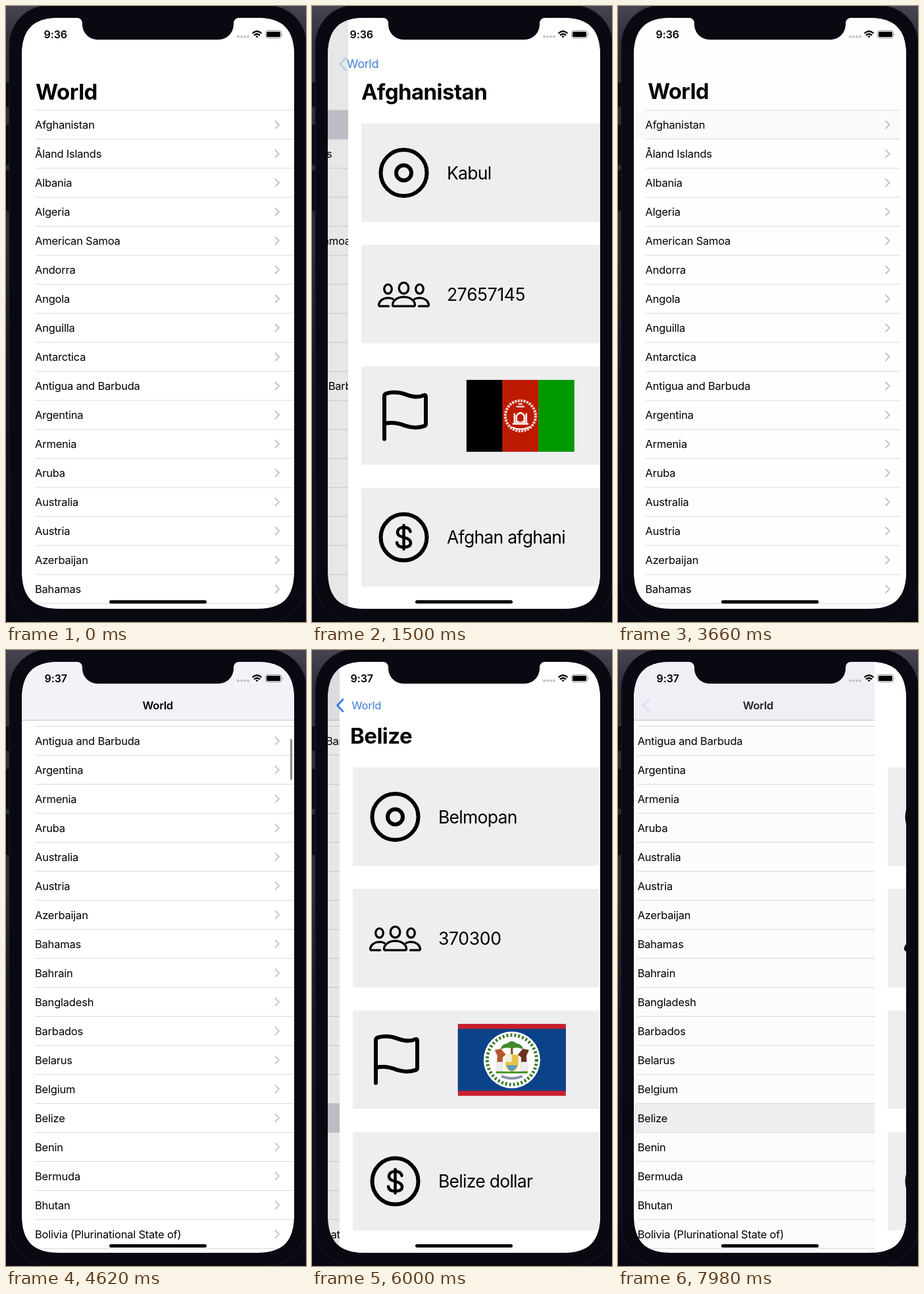
An HTML page that plays this animation: 456 px wide and 934 px high, repeating every 8000 ms.

```html
<!DOCTYPE html>
<html lang="en">
<head>
<meta charset="utf-8">
<title>World list</title>
<style>
  html, body { margin: 0; width: 100%; height: 100%; overflow: hidden; background: #0a0a14; }
  svg { display: block; width: 456px; height: 934px; }
  text { font-family: Inter, "Liberation Sans", sans-serif; }
  .row { font-size: 16.5px; letter-spacing: -.22px; }
  .big { font-size: 33px; font-weight: 700; letter-spacing: -.55px; }
  .val { font-size: 26.5px; letter-spacing: -.72px; }
  .num { letter-spacing: -.3px; }
  .mid { font-size: 16.5px; font-weight: 600; letter-spacing: -.2px; }
  .back { font-size: 16.5px; letter-spacing: -.2px; fill: #3b7ddd; }
  .time { font-size: 16px; font-weight: 600; letter-spacing: -.1px; }
  .ink { fill: none; stroke: #000; stroke-linecap: round; stroke-linejoin: round; }
</style>
</head>
<body>
<svg viewBox="0 0 456 934">
  <defs>
    <linearGradient id="wall" x2="0" y2="1">
      <stop offset="0" stop-color="#454450"/>
      <stop offset=".06" stop-color="#302f38"/>
      <stop offset=".4" stop-color="#2b2b33"/>
      <stop offset=".6" stop-color="#15151f"/>
      <stop offset="1" stop-color="#080812"/>
    </linearGradient>
    <clipPath id="screen">
      <path d="M24 76C24 35 41 18 82 18H380C421 18 438 35 438 76V856C438 897 421 914 380 914H82C41 914 24 897 24 856Z"/>
    </clipPath>
  </defs>

  <rect width="456" height="934" fill="url(#wall)"/>
  <g fill="#0b0b14" stroke="#050509">
    <rect x=".5" y="116.500" width="8" height="36" rx="1"/>
    <rect x=".5" y="180.500" width="8" height="60" rx="1"/>
    <rect x=".5" y="249.500" width="8" height="61" rx="1"/>
  </g>
  <rect x="5" y="-1" width="452" height="935" rx="60" fill="#090912" stroke="#1c1c26"/>

  <g clip-path="url(#screen)">
    <rect x="24" y="18" width="414" height="896" fill="#fff"/>
    <g id="list">
      <g id="rows"></g>
      <rect id="bar" x="24" y="18" width="414" height="88"/>
      <path id="rule" d="M24 106.500H438" stroke="#c4c4c9"/>
    </g>
    <rect id="dim" x="24" y="18" width="414" height="896"/>
    <rect id="thumb" x="432" width="3" height="62" rx="1.500" fill="#8a8a8d"/>
    <g id="pages"></g>
    <g id="nav">
      <path id="chev" d="M47 75L38.500 84L47 93" class="ink" style="stroke:#3b7ddd" stroke-width="2.800"/>
      <text id="large" class="big">World</text>
      <text id="inline" class="mid">World</text>
      <text id="label" class="back">World</text>
    </g>
    <text id="clock" class="time" y="48.500"></text>
    <g fill="#c3c3c5">
      <circle cx="353" cy="46.500" r="2"/><circle cx="358" cy="46.500" r="2"/>
      <circle cx="363" cy="46.500" r="2"/><circle cx="368" cy="46.500" r="2"/>
    </g>
    <g class="ink" stroke-width="2.300" style="stroke-linecap:butt">
      <path d="M374.500 41.500Q381.500 35 388.500 41.500M377 44.500Q381.500 40.500 386 44.500"/>
      <path d="M379.300 46L381.500 48.300L383.700 46Q381.500 44.500 379.300 46Z" fill="#000" stroke="none"/>
    </g>
    <rect x="394.500" y="37.500" width="24" height="11" rx="3" fill="none" stroke="#8c8c8c"/>
    <rect x="396" y="39" width="21" height="8" rx="1.600"/>
    <path d="M420 41.500Q421.800 43 420 45Z" fill="#8c8c8c"/>
    <rect x="157" y="901" width="148" height="5" rx="2.500"/>
  </g>
  <path fill="#090912" d="M108 17V18A8 8 0 0 1 116 26V28A23 23 0 0 0 139 51H323A23 23 0 0 0 346 28V26A8 8 0 0 1 354 18V17Z"/>
</svg>

<script>
const $ = id => document.getElementById(id);
const clamp = x => Math.max(0, Math.min(1, x));
const set = (id, attrs) => { for (const k in attrs) $(id).setAttribute(k, attrs[k]); };

const LOOP = 8000, STEP = 60, SCROLL = 438.4, TOP = 158, ROW = 44;
const countries = ('Afghanistan|Åland Islands|Albania|Algeria|American Samoa|Andorra|Angola|Anguilla|' +
  'Antarctica|Antigua and Barbuda|Argentina|Armenia|Aruba|Australia|Austria|Azerbaijan|Bahamas|Bahrain|' +
  'Bangladesh|Barbados|Belarus|Belgium|Belize|Benin|Bermuda|Bhutan|Bolivia (Plurinational State of)').split('|');

$('rows').innerHTML = `<rect id="hit" x="24" width="414" height="${ROW}" fill="#d0cfd8"/>` +
  countries.map((name, i) => {
    const y = TOP + ROW * i;
    return `<path d="M44 ${y}H438" stroke="#dadadc"/>
      <text class="row" x="44" y="${y + 28}">${name}</text>
      <path d="M409.500 ${y + 16.5}l5.500 5.500l-5.500 5.500" class="ink" style="stroke:#c4c4c7" stroke-width="2"/>`;
  }).join('') + `<path d="M44 ${TOP + ROW * countries.length}H438" stroke="#dadadc"/>`;

// Icons are centred on 0,0
const ring = '<circle r="35" stroke-width="6"/>';
const side = `<ellipse cx="-24" cy="-8" rx="5.800" ry="7"/>
  <path d="M-23 18H-35.500Q-38 18 -38 15.500C-37 9 -31 5.500 -24 5.500Q-20 5.500 -16.500 7"/>`;
const icons = [
  ring + '<circle r="11.500" stroke-width="6"/>',
  `<g stroke-width="3.300"><ellipse cy="-9.500" rx="7.300" ry="8.300"/>
   <path d="M-17 16C-17 9 -9 4 0 4S17 9 17 16Q17 18 14.500 18H-14.500Q-17 18 -17 16Z"/>
   ${side}<g transform="scale(-1 1)">${side}</g></g>`,
  `<path stroke-width="6" d="M-29.500 35V-30Q-29.500 -33 -26 -34C-15 -37 -4 -35 4 -32C14 -28.500 24 -28 30 -31
   Q33.500 -32.500 33.500 -29V12Q33.500 14.500 31 15.500C20 19.500 11 18 2 15C-8 11 -18 9 -29.500 12"/>`,
  ring + `<path stroke-width="4.500" d="M10 -8.500C9 -13 5 -15 0 -15C-6 -15 -9.500 -12 -9.500 -7.500
   C-9.500 -3 -6 -1.500 0 0C6 1.500 10.500 3.500 10.500 8.500C10.500 13 6 15 0 15C-6 15 -10 12.500 -10.500 8M0 -18V18"/>`
];

// Flags are 164 x 109, centred on 0,0
const box = (x, y, w, h, c) => `<rect x="${x}" y="${y}" width="${w}" height="${h}" fill="${c}"/>`;
const flags = {
  Afghanistan: box(-82, -54.5, 55, 109, '#000') + box(-27.3, -54.5, 54.6, 109, '#be1a00') +
    box(27.3, -54.5, 54.7, 109, '#090') +
    `<g fill="none" stroke="#fff">
      <circle r="23" stroke-width="4" stroke-dasharray="3 1.500" opacity=".85"/>
      <path d="M-9 11V-4M9 11V-4M-12 12H12M-6 9V0Q0 -9 6 0V9Z" stroke-width="2.500"/>
      <path d="M-6 -14H6M-3 -18H3M-14 17Q0 23 14 17" stroke-width="2"/></g>
      <path d="M-2 9V4Q0 1 2 4V9Z" fill="#be1a00"/>`,
  Belize: box(-82, -54.5, 164, 109, '#c81f2b') + box(-82, -47, 164, 94, '#0b4389') +
    `<circle r="43" fill="#fff"/>
     <circle r="37.500" fill="none" stroke="#3d7a2c" stroke-width="5" stroke-dasharray="3 3"/>
     <path d="M0 -8V-20" stroke="#7a4a20" stroke-width="3"/>
     <path d="M-17 -16Q-16 -24 -7 -25Q0 -32 7 -25Q16 -24 17 -16Q8 -20 0 -17Q-8 -20 -17 -16Z" fill="#3f8a2e"/>
     <path d="M-24 17L-22 -6L-26 -15L-17 -17L-9 -8L-14 -4V17Z" fill="#b5552d"/>
     <path d="M24 17L22 -6L26 -15L17 -17L9 -8L14 -4V17Z" fill="#6d2f22"/>
     <path d="M-24 3H-14V17H-24ZM14 3H24V17H14Z" fill="#eee"/>
     <path d="M-10 -8H10V8Q8 16 0 18Q-8 16 -10 8Z" fill="#e8c34a"/>
     <path d="M-10 -8H0V3H-10Z" fill="#f3f0df"/><path d="M-8 8H8Q6 15 0 17Q-6 15 -8 8Z" fill="#5a9bc9"/>
     <path d="M-24 19H24" stroke="#4e9636" stroke-width="3"/>
     <path d="M-16 25Q0 31 16 25" fill="none" stroke="#8795b5" stroke-width="4"/>`
};

const page = (name, city, people, money) => {
  const cards = [city, people, null, money].map((value, i) => {
    const y = 178 + 184.2 * i, mid = y + 75;
    const body = value
      ? `<text class="val ${i == 1 ? 'num' : ''}" x="174" y="${mid + 9.7}">${value}</text>`
      : `<g transform="translate(285.800 ${mid})">${flags[name]}</g>`;
    return box(44, y, 374, 149.3, '#eeeef1') +
      `<g class="ink" transform="translate(108.500 ${mid})">${icons[i]}</g>` + body;
  }).join('');
  return `<g id="${name}">${box(24, 18, 414, 896, '#fff')}${cards}
    <text class="big" id="${name}Title" x="44" y="142">${name}</text></g>`;
};
$('pages').innerHTML = page('Afghanistan', 'Kabul', '27657145', 'Afghan afghani') +
  page('Belize', 'Belmopan', '370300', 'Belize dollar');

// Tap, push and pop times; drift is how far the heading follows its page
const visits = [
  { name: 'Afghanistan', tap: 1080, push: 1267, pop: 3340, drift: 1 },
  { name: 'Belize', tap: 5600, push: 5732, pop: 7777, drift: .78 }
];

const spring = ms => {
  const x = .01826 * Math.max(0, ms);
  return 1 - (1 + x) * Math.exp(-x);
};

function draw(t) {
  const scroll = SCROLL * (1 - (1 - clamp((t - 3900) / 700)) ** 3);
  const compact = scroll > 52;
  const visit = visits[t < 4500 ? 0 : 1];
  const leaving = t >= visit.pop;
  const v = leaving ? 1 - spring(t - visit.pop) : spring(t - visit.push);
  const rest = 1 - v;
  const slide = Math.round(414 * rest);

  set('list', { transform: `translate(${-124 * v} 0)` });
  set('rows', { transform: `translate(0 ${-scroll})` });
  set('hit', {
    y: TOP + ROW * countries.indexOf(visit.name),
    opacity: leaving ? v ** .6 : +(t >= visit.tap)
  });
  set('bar', { fill: compact ? '#f3f2f8' : '#fff' });
  set('rule', { opacity: +compact });
  set('dim', { opacity: .1 * v });
  set('thumb', {
    y: TOP - Math.min(scroll, 52) + scroll * .066,
    opacity: t < 3900 ? 0 : 1 - clamp((t - 4900) / 300)
  });

  for (const { name, drift } of visits) {
    const on = name == visit.name && v > .0005;
    set(name, { transform: `translate(${slide} 0)`, display: on ? 'inline' : 'none' });
    set(name + 'Title', { x: 44 - slide * (1 - drift), opacity: clamp((v - .2) * 2) });
  }

  // The list heading turns into the back label
  const first = visit == visits[0];
  const at = first
    ? `translate(${45 + 8.5 * v} ${142 - 52 * v - scroll})`
    : `translate(${53.5 + 154 * rest} 90)`;
  set('large', { transform: `${at} scale(${1 - v / 2})`, opacity: first ? rest * clamp(1 - scroll / 45) : 0 });
  set('inline', {
    transform: first ? 'translate(207.500 90)' : at,
    opacity: first ? clamp((scroll - 52) / 60) : rest
  });
  set('label', { transform: first ? `${at} scale(${1 + rest})` : at, opacity: v });
  const lag = first && !leaving ? 55 * rest : 0;
  set('chev', {
    transform: `translate(${lag} ${lag})`,
    opacity: leaving ? v : clamp((v - .915) / .04)
  });

  const late = t >= 4200;
  $('clock').textContent = late ? '9:37' : '9:36';
  set('clock', { x: late ? 58.5 : 57.5 });
}

function tick() {
  const t = performance.now() % LOOP;
  draw(Math.floor(t / STEP) * STEP);
  requestAnimationFrame(tick);
}
tick();
</script>
</body>
</html>
```
